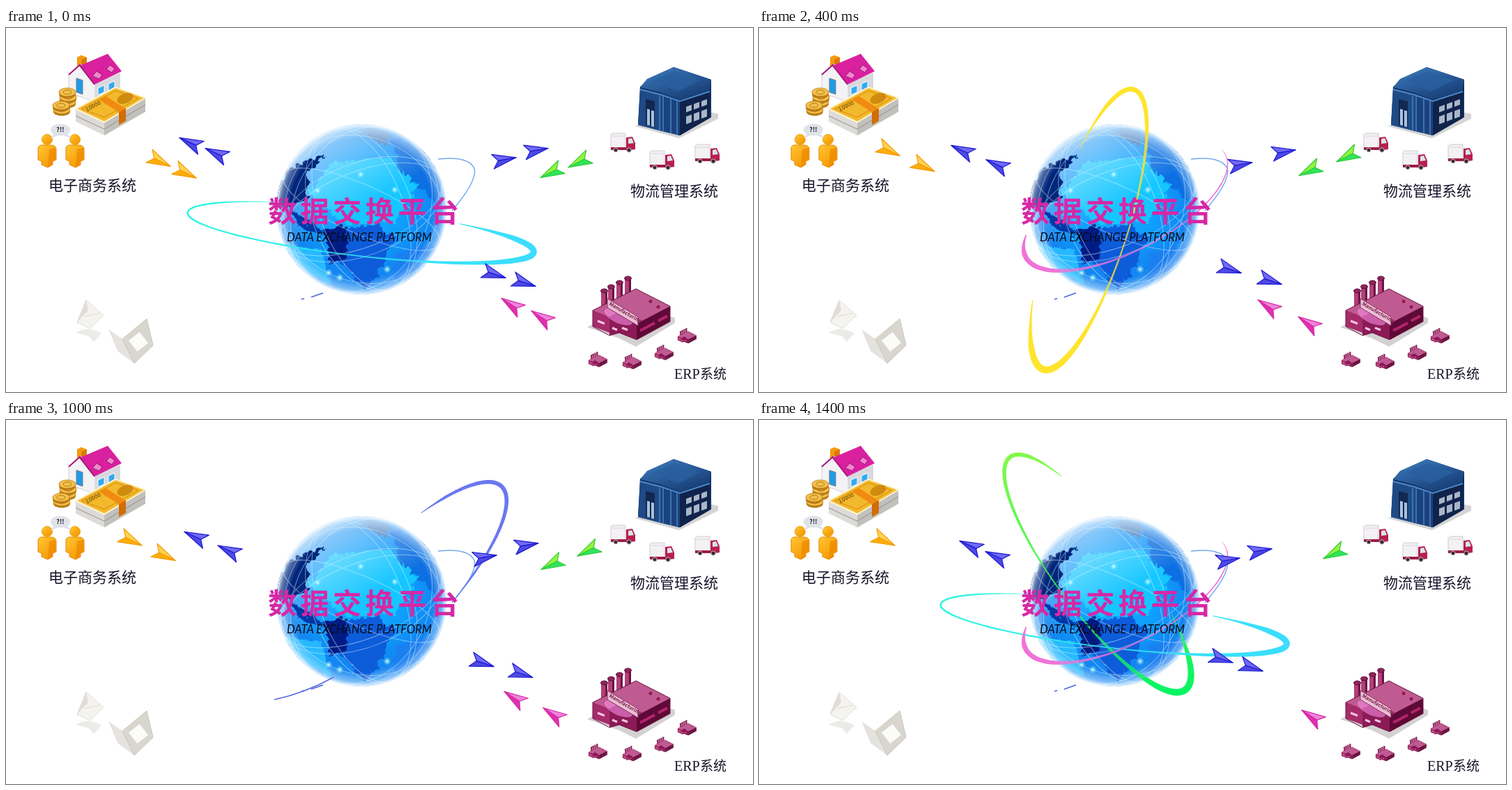
These frames come from a looping animation (1072x522 px, 1600 ms). An HTML page:

```html
<!DOCTYPE html>
<html lang="zh">
<head>
<meta charset="utf-8">
<title>数据交换平台</title>
<style>
html, body { margin: 0; width: 100%; height: 100%; overflow: hidden; background: #fff }
svg { display: block; width: 1072px; height: 522px }
text { font-family: "Noto Sans CJK SC", "Noto Sans CJK", sans-serif; fill: #15152b }
.latin { font-family: "Liberation Serif", serif }
.label { font-size: 21px; font-weight: 500 }
</style>
</head>
<body>
<svg viewBox="0 0 1072 522">
<defs>
  <radialGradient id="sea" cx=".5" cy=".44" r=".56">
    <stop offset="0" stop-color="#10b2ff"/><stop offset=".5" stop-color="#0f9dfc"/>
    <stop offset=".8" stop-color="#1284f0"/><stop offset="1" stop-color="#3c9cf4"/>
  </radialGradient>
  <radialGradient id="rim">
    <stop offset=".84" stop-color="#fff" stop-opacity="0"/><stop offset=".95" stop-color="#e8f5ff" stop-opacity=".4"/>
    <stop offset="1" stop-color="#fff" stop-opacity=".9"/>
  </radialGradient>
  <linearGradient id="haze" x1=".2" x2=".5" y2=".5">
    <stop offset="0" stop-color="#fff" stop-opacity=".7"/><stop offset="1" stop-color="#fff" stop-opacity="0"/>
  </linearGradient>
  <radialGradient id="glow"><stop offset="0" stop-color="#e8ffff"/><stop offset="1" stop-color="#5df" stop-opacity="0"/></radialGradient>
  <linearGradient id="cyan"><stop offset="0" stop-color="#2cf5e2"/><stop offset="1" stop-color="#3cdcff"/></linearGradient>
  <linearGradient id="green" x2="0" y2="1"><stop offset="0" stop-color="#84f94a"/><stop offset="1" stop-color="#06f463"/></linearGradient>
  <linearGradient id="gold" x2=".8" y2="1"><stop offset="0" stop-color="#ffc832"/><stop offset="1" stop-color="#f59400"/></linearGradient>
  <linearGradient id="steel" x2=".7" y2="1"><stop offset="0" stop-color="#3f7fc0"/><stop offset="1" stop-color="#173c76"/></linearGradient>
  <clipPath id="disc"><circle cx="510" cy="260" r="122"/></clipPath>
  <mask id="veil" maskUnits="userSpaceOnUse" x="0" y="0" width="1072" height="522">
    <rect width="1072" height="522" fill="#fff"/><circle cx="510" cy="260" r="118" fill="#ccc"/>
  </mask>
  <filter id="coast">
    <feTurbulence baseFrequency=".07" numOctaves="2" seed="4"/>
    <feDisplacementMap in="SourceGraphic" scale="14" xChannelSelector="R" yChannelSelector="G"/>
  </filter>

  <g id="coin">
    <ellipse cy="3" rx="12" ry="6" fill="#b87a14"/>
    <ellipse rx="12" ry="6" fill="#f3c04e" stroke="#c98d1e"/>
    <ellipse rx="6" ry="3" fill="none" stroke="#b87a14"/>
  </g>
  <g id="person">
    <path d="M-13 12Q-12 7-5 8H6Q12 8 13 13V29L8 31V36L1 40-8 36V31L-13 29Z" fill="url(#gold)" stroke="#e98a00"/>
    <path d="M3 14L12 12V29L8 31V36L1 40Z" fill="#ee8c00" opacity=".8"/>
    <circle r="7.5" fill="url(#gold)" stroke="#f0a010"/>
  </g>
  <g id="truck">
    <path d="M0 2L3 0H21V22H0Z" fill="#f3f1f3" stroke="#cfcbd0"/>
    <path d="M2 4H20" stroke="#d8d4d8"/>
    <path d="M22 6L31 5 35 14V23L22 25Z" fill="#b8204c"/>
    <path d="M25 8L30 7 33 14 25 15Z" fill="#d8e4ee"/>
    <path d="M0 20H22V24H0Z" fill="#a01c46"/>
    <g fill="#38293a" stroke="#c9c3ca"><circle cx="7" cy="24" r="3"/><circle cx="26" cy="24" r="3.2"/></g>
  </g>
  <g id="stack">
    <path d="M0 4V34L9 37V4Z" fill="#b23f79"/><path d="M6 4V36L9 37V4Z" fill="#6d1243"/>
    <ellipse cx="4.5" cy="4" rx="5" ry="3" fill="#8c2558" stroke="#5c0d37"/>
  </g>
  <g id="plant">
    <use href="#stack" x="854" y="373"/><use href="#stack" x="864" y="367"/>
    <use href="#stack" x="876" y="361"/><use href="#stack" x="888" y="355"/>
    <path d="M842 405L904 374 953 399 904 428 880 418 866 425Z" fill="#c05a92"/>
    <path d="M842 405L866 414V437L842 428Z" fill="#a62b6a"/>
    <path d="M866 414L882 406 905 424V447L880 437 866 441Z" fill="#8c1a57"/>
    <path d="M905 424L953 399V421L905 447Z" fill="#5e0a36"/>
    <path d="M842 405L904 374 953 399V421L905 447 880 437 866 441 842 428Z" fill="none" stroke="#6a1540"/>
    <path d="M849 420l10 4M870 430l7 3M884 430l8 3" stroke="#f4c4dc" stroke-width="3"/>
    <path d="M910 434L931 423M936 420L949 413" stroke="#b3246d" stroke-width="4"/>
    <circle cx="925" cy="392" r="2.5" fill="#8c1d54"/><circle cx="936" cy="400" r="2.5" fill="#8c1d54"/>
  </g>
</defs>

<!-- shop, money and customers -->
<path d="M102 42L108 39 116 42V60L102 67Z" fill="#f79a12"/><path d="M108 45L116 42V60L108 64Z" fill="#d97b08"/>
<path d="M90 67L107 51 128 80V106L90 93Z" fill="#f3f2f4" stroke="#d2d0d4"/>
<path d="M128 79L164 64V91L128 106Z" fill="#d9d8dd"/>
<path d="M106 54L146 37 166 62 127 81Z" fill="#d9209f"/>
<path d="M106 54L127 81M90 67L107 52" stroke="#a51679" stroke-width="2"/>
<path d="M124 69l6-7 8 5-4 6zM144 59l5-6 7 5-4 6z" fill="#ef86cd" stroke="#9c1874"/>
<path d="M101 72L110 75V95L101 92Z" fill="#1f9be8" stroke="#7a7a88"/>
<path d="M132 86l9-4v10l-9 4zM147 80l9-4v10l-9 4z" fill="#34a9ee" stroke="#fff"/>
<path d="M100 117L141 136 200 101V120L141 154 100 134Z" fill="#dcdbd8"/>
<path d="M141 136L200 101V120L141 154Z" fill="#c1c0bd"/>
<path d="M100 126L141 145 200 110" fill="none" stroke="#91908e"/>
<path d="M100 116L157 85 200 100 141 135Z" fill="#f3b92d" stroke="#fff3cf" stroke-width="2"/>
<path d="M109 116L157 90 190 101 141 128Z" fill="none" stroke="#d38a09"/>
<ellipse cx="171" cy="101" rx="12" ry="7" fill="#cf8c10" transform="rotate(-22 171 101)"/>
<path d="M134 103L144 98 172 116V133L162 139V121Z" fill="#f08a10"/><path d="M162 121L172 115V133L162 139Z" fill="#d26d04"/>
<text transform="translate(116 120) rotate(-28)" font-size="8" font-weight="700" style="fill:#8b5a05">10000</text>
<use href="#coin" x="88" y="106"/><use href="#coin" x="89" y="99"/><use href="#coin" x="88" y="92"/>
<use href="#coin" x="80" y="117"/><use href="#coin" x="79" y="111"/>
<use href="#person" x="59" y="160"/><use href="#person" x="99" y="160"/>
<path d="M69 151L64 158 75 154M87 151L94 158 82 154" fill="#dfe3e8"/>
<ellipse cx="78" cy="146" rx="14" ry="8.500" fill="#dfe3e8"/>
<text x="78" y="149" font-size="9" font-weight="700" text-anchor="middle">?!!</text>

<!-- warehouse and trucks -->
<path d="M903 141L966 158 1022 130V123L960 110Z" fill="#d5d3d3"/>
<path d="M910 84L958 56 1012 74V128L967 154 907 139Z" fill="#142f60"/>
<path d="M910 85L920 73 958 56 1012 74 1009 90 967 103 941 93Z" fill="url(#steel)"/>
<path d="M928 75L959 62 996 75 964 91Z" fill="#2a5f9f" opacity=".8"/>
<path d="M910 87L941 95V148L907 139Z" fill="#1f4a86"/>
<path d="M941 95L967 104V154L941 148Z" fill="#1b427c"/>
<path d="M967 104L1010 90V129L967 154Z" fill="#10234a"/>
<path d="M910 88L941 96 967 105 1010 91" fill="none" stroke="#4c88c8" stroke-width="2"/>
<path d="M938 98V147M943 98V148M954 102V151M963 104V152" stroke="#3b73b4" stroke-width="2"/>
<path d="M918 102l13 3v38l-13-4z" fill="#12284f"/><path d="M920 116l4 1v23l-4-1zM926 118l4 1v23l-4-1z" fill="#a9c2dc"/>
<g id="windows" fill="#a9b6c8"></g>
<use href="#truck" x="868" y="151"/><use href="#truck" x="924" y="176"/><use href="#truck" x="989" y="167"/>

<!-- factory -->
<path d="M834 429L880 445 904 457 960 423V416L900 395Z" fill="#d3d1d2"/>
<use href="#plant"/>
<ellipse cx="879" cy="414" rx="22" ry="9" fill="#f68de0" opacity=".6" transform="rotate(25 879 414)"/>
<path d="M863 388L907 414V427L863 401Z" fill="#e9bfd4" stroke="#86305e"/>
<text transform="translate(865 397) rotate(30)" font-size="7.200" font-weight="700" style="fill:#7d174b">Manufacturing</text>
<use href="#plant" transform="translate(634 379) scale(.24)"/><use href="#plant" transform="translate(683 382) scale(.24)"/>
<use href="#plant" transform="translate(729 369) scale(.24)"/><use href="#plant" transform="translate(762 345) scale(.24)"/>

<!-- faded papers -->
<path d="M100 437Q117 426 137 438L126 450 119 442Z" fill="#ebebe9"/>
<path d="M102 422L115 390 140 412 120 431Z" fill="#f4f3ef" stroke="#e0dfda"/>
<path d="M115 390L118 405 102 422Z" fill="#dfddd6"/><path d="M112 414L134 409" stroke="#f1d5ca"/>
<path d="M147 432L167 446 184 481 160 463Z" fill="#e5e3dd"/>
<path d="M167 446L202 417 211 455 184 481Z" fill="#d8d6cd" stroke="#c8c6bd"/>
<rect x="180" y="440" width="20" height="20" fill="#fbfbf8" transform="rotate(-38 190 450)"/>

<!-- globe -->
<g clip-path="url(#disc)">
  <circle cx="510" cy="260" r="122" fill="url(#sea)"/>
  <g filter="url(#coast)">
    <path d="M432 232L462 190 536 180 590 220 556 275 480 277Z" fill="#12c6ff"/>
    <path d="M549 153L602 176 622 214 618 250 566 205Z" fill="#0b70e2"/>
    <path d="M505 148L528 141 550 152 541 166Z" fill="#3474bd"/>
    <path d="M395 305L448 314 463 368 412 336Z" fill="#28b9ff"/>
    <path d="M558 318L615 306 584 347 550 362Z" fill="#1b7ff0"/>
    <path d="M450 288L522 277 555 295 530 350 512 372 480 335Z" fill="#0a5cda"/>
  </g>
  <circle cx="510" cy="260" r="122" fill="url(#haze)"/>
  <g filter="url(#coast)">
    <path d="M388 225L400 199 455 178 431 203 430 240 388 257Z" fill="#04287c"/>
    <path d="M404 256L436 276 452 292 415 282Z" fill="#0538a6"/>
    <path d="M450 285L486 281 485 328 463 332Z" fill="#031c84"/>
  </g>
  <g id="grid" fill="none" stroke="#d8f4ff" opacity=".5"></g>
  <circle cx="510" cy="260" r="122" fill="url(#rim)"/>
  <g id="sparks" fill="url(#glow)"></g>
</g>
<path d="M620 188Q663 183 672 201Q677 219 640 262" fill="none" stroke="#70a9ee" stroke-width="1.500"/>
<path d="M424 389l4-1M438 386L455 380" stroke="#4b63dc" stroke-width="1.500"/>

<g id="orbits" mask="url(#veil)"></g>
<text x="376" y="278" font-size="41" letter-spacing="5.600" font-weight="700" style="fill:#d628a6">数据交换平台</text>
<text x="403" y="306" font-size="16.400" font-style="italic" style="font-family:Lato,sans-serif;fill:#0b0b1c">DATA EXCHANGE PLATFORM</text>
<text x="61" y="233" class="label">电子商务系统</text>
<text x="896" y="241" class="label">物流管理系统</text>
<text x="959" y="503" font-size="20" class="latin">ERP</text>
<text x="996" y="503" font-size="19" font-weight="500">系统</text>
<g id="arrows"></g>
</svg>
<script>
const STEP = 200, STEPS = 8, RAD = Math.PI / 180;
const fill = (id, parts) => document.getElementById(id).innerHTML = parts.join("");
const range = n => [...Array(n).keys()];

// Arc of a tilted ellipse; its band swells to `head` at 0° and to `tail` at 180°.
function orbit(color, cx, cy, rx, ry, tilt, from, to, head, tail) {
  const outer = [], inner = [], c = Math.cos(tilt * RAD), s = Math.sin(tilt * RAD);
  for (let i = 0; i <= 90; i++) {
    const k = i / 90, a = (from + (to - from) * k) * RAD, ca = Math.cos(a), sa = Math.sin(a);
    const taper = Math.min(1, .25 + 8 * Math.min(k, 1 - k));
    const half = (2 + ((ca > 0 ? head : tail) - 2) * ca * ca) * taper / 2;
    const nx = ca * ry, ny = sa * rx, n = half / Math.hypot(nx, ny);
    const at = side => {
      const u = rx * ca + side * nx * n, v = ry * sa + side * ny * n;
      return `${(cx + u * c - v * s).toFixed(1)},${(cy + u * s + v * c).toFixed(1)}`;
    };
    outer.push(at(1));
    inner.unshift(at(-1));
  }
  return `<polygon points="${[...outer, ...inner].join(" ")}" fill="${color}"/>`;
}

const orbits = {
  cyan: orbit("url(#cyan)", 509, 293, 250, 34, 6.5, 240, -56, 9, 2.5),
  yellow: orbit("#ffe42c", 473, 289, 211, 55, -72, -60, 235, 7, 10),
  green: orbit("url(#green)", 486, 220, 209, 58, 53, 227, -58, 10, 6),
  blue: orbit("#6a78f0", 557, 255, 222, 66, -46, -59, 76, 6, 2)
    + '<path d="M385 401Q428 392 470 369" fill="none" stroke="#5366e0" stroke-width="1.500"/>',
  pink: orbit("#ee74d8", 526, 255, 161, 65, -27, 205, -8, 1.5, 7),
};
const shown = ["cyan", "blue", "yellow pink", "green", "green yellow blue cyan", "blue", "yellow", "green cyan pink"];

// Arrows queue along a straight lane: the lead one's x per step, the rest at even gaps.
const spread = [1, 1.2, 1.35, 1, 1.45, 1.3, 1, 1];
const out = { colors: ["#7069f3", "#4d49e4", "#1c18d2"], counts: "22233212" };
const back = colors => ({ colors, counts: "22233211" });
const orange = back(["#ffd252", "#ffad0b", "#f39a00"]);
const lime = back(["#94f43c", "#2fe45d", "#30cc3b"]);
const rose = back(["#ef83dc", "#df2fae", "#d42aa4"]);
const lanes = [
  { ...out, x: 231, y: 150, slope: .41, gap: 37, turn: 205, lead: [249, 238, 276, 231, 223, 256, 281, 288] },
  { ...orange, x: 195, y: 180, slope: .45, gap: 37, turn: 26, lead: [236, 203, 202, 213, 195, 195, 228, 195] },
  { ...out, x: 690, y: 198, slope: -.29, gap: 46, turn: -10, lead: [732, 720, 708, 757, 701, 704, 745, 690] },
  { ...lime, x: 696, y: 241, slope: -.37, gap: 40, turn: 153, lead: [767, 771, 775, 696, 709, 768, 774, 810] },
  { ...out, x: 680, y: 348, slope: .28, gap: 43, turn: 18, lead: [717, 706, 692, 701, 686, 700, 732, 680] },
  { ...rose, x: 650, y: 362, slope: .42, gap: 43, turn: 213, lead: [711, 714, 716, 650, 646, 715, 748, 779] },
];

function arrows({ colors: [light, dark, edge], counts, x, y, slope, gap, turn, lead }, step) {
  const flip = Math.abs(turn) > 90 ? -1 : 1; // keeps the lit half on top
  return range(+counts[step]).map(i => {
    const tip = lead[step] + i * gap * spread[step];
    return `<g transform="translate(${tip} ${y + slope * (tip - x)}) rotate(${turn}) scale(1 ${flip})"
      stroke="${edge}" stroke-width="1.2" stroke-linejoin="round">
      <path d="M0 0L-34 -10.5 -26 0Z" fill="${light}"/><path d="M0 0L-26 0 -34 10.500Z" fill="${dark}"/></g>`;
  }).join("");
}

fill("windows", range(6).map(i =>
  `<path d="M${976 + i % 3 * 11} ${(i < 3 ? 113 : 127) - i % 3 * 4}l8 -3v${i < 3 ? 8 : 11}l-8 3z"/>`));
fill("grid", range(8).map(i =>
  `<ellipse cx="510" cy="260" rx="122" ry="${35 + i * 37 % 80}" transform="rotate(${24 + i * 45} 510 260)"/>`));
fill("sparks", [[509, 210], [447, 233], [463, 351], [479, 358], [547, 346], [558, 232]].map(([x, y]) =>
  `<circle cx="${x}" cy="${y}" r="6"/>`));

let current = -1;
function draw() {
  const step = Math.floor(performance.now() / STEP) % STEPS;
  if (step !== current) {
    current = step;
    fill("orbits", shown[step].split(" ").map(name => orbits[name]));
    fill("arrows", lanes.map(lane => arrows(lane, step)));
  }
  requestAnimationFrame(draw);
}
draw();
</script>
</body>
</html>
```
